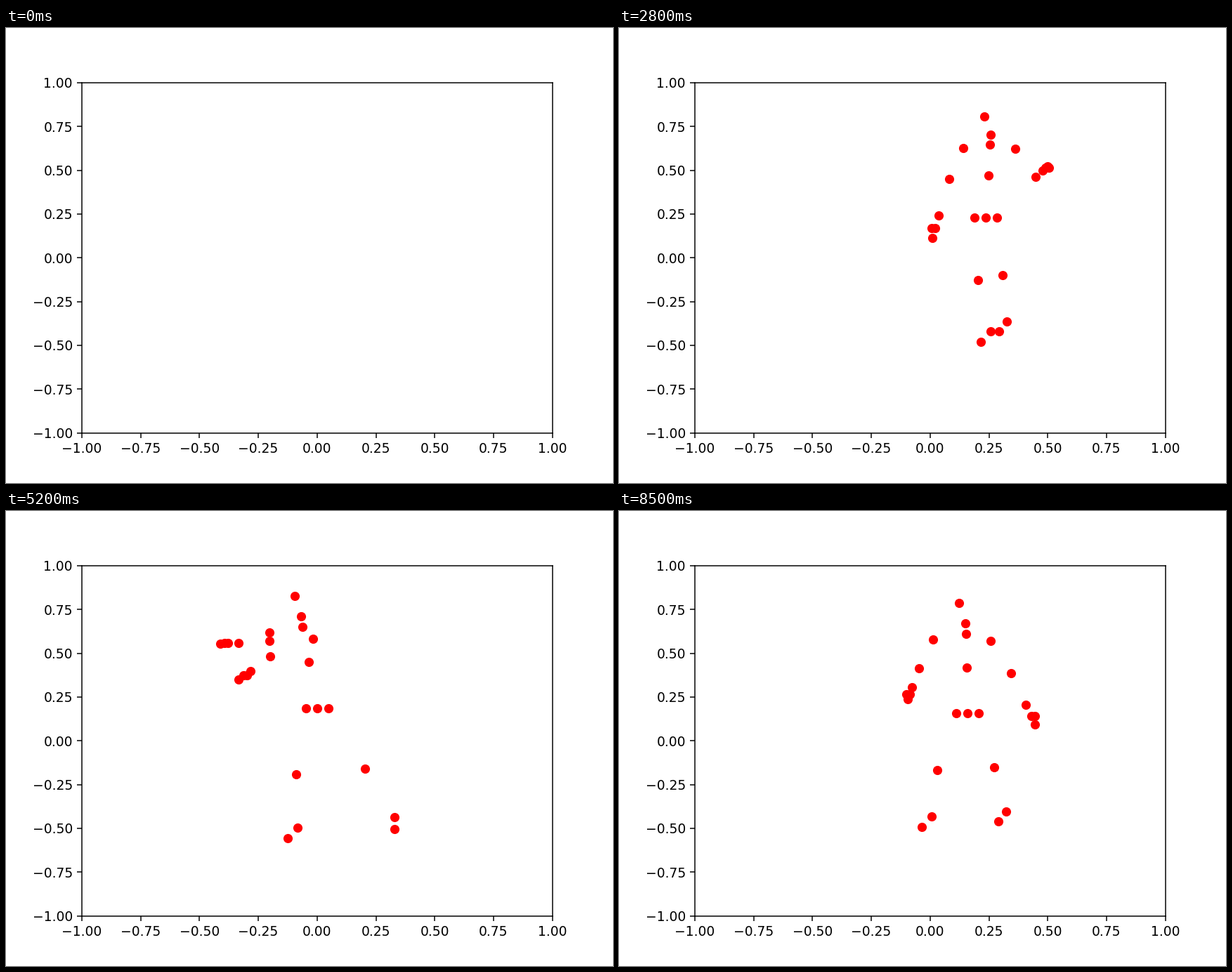
Recreate the animation shown at these times as a matplotlib script. Size 864x648 px, loop 8.6 s.

```python
import numpy as np
import matplotlib.pyplot as plt
from matplotlib.animation import FuncAnimation

FRAMES, STEP = 86, 100
# Stage pixels as complex numbers (y down): axes centre and half size
CENTRE, HALF_W, HALF_H = 443.4 + 327.8j, 334.8, 249.48


def ramp(i, start, end):
    return min(max((i - start) / (end - start), 0), 1)


def ease(i, start, end):
    u = ramp(i, start, end)
    return u * u * (3 - 2 * u)


def pulse(i, start, end):
    return np.sin(np.pi * ramp(i, start, end))


def follow(weights, first, *stops):
    """Move through the stops one after another."""
    p = first
    for w, stop in zip(weights, stops):
        p += w * (stop - p)
    return p


def arm(shoulder, elbow, hand, side):
    """Elbow and hand are relative to the shoulder; the rest follows."""
    forearm = hand - elbow
    offsets = [0, elbow, hand - forearm / 4, hand, hand + forearm / 5,
               hand + 5 * side]
    return [shoulder + d for d in offsets]


def leg(hip, ankle, foot, bow):
    knee = hip + 0.55 * (ankle - hip) + bow
    return [hip, knee, ankle, ankle + foot]


def figure_at(i):
    """All joints of the body at step i."""
    wave = ramp(i, 18, 38) ** 2
    lift = 1 - (1 - ramp(i, 21, 38)) ** 2
    turn = ease(i, 39, 50)
    sink = ease(i, 52, 73)
    back = ease(i, 77, 85)

    # Spine: a slightly bowed line from head to base
    base = (523 + 270j + 2j * wave + (-79 + 10j) * turn
            + (-7 + 17j) * sink + (60 - 10j) * back)
    head = (base - 4 - 144j + 5 * wave - (33 + 16j) * turn
            - (1 + 3j) * sink + (21 + 6j) * back)
    bow = 11 - 8 * turn + 3 * sink + 2 * back
    neck, chest, waist = [head + f * (base - head) + bow * (1 - f)
                          for f in (0.18, 0.275, 0.585)]

    shoulder_a = (chest - 36 + 4j + (-11 + 4j) * wave
                  + (7 - 7j) * (sink - back))
    shoulder_b = (chest + 32 + 10j + (5 - 5j) * lift + (-22 + 12j) * turn
                  + (8 - 9j) * sink + (12 + 2j) * back)

    moves = wave, turn, sink, back
    elbow_a = follow(moves, -11 + 47j, -44 + 35j, 12j, -12 + 34j, -20 + 41j)
    hand_a = follow(moves, -19 + 118j, -100 + 104j, -59 + 15j, -60 + 85j,
                    -33 + 78j) - 35 * pulse(i, 75, 85)
    moves = lift, turn, sink, back
    elbow_b = follow(moves, 5 + 51j, 42 + 34j, -61 + 25j, 2 + 44j, 29 + 46j)
    hand_b = follow(moves, 116j, 46 - 20j, -99 + 52j, -17 + 101j,
                    58 + 107j) + 15 * np.sin(np.pi * lift)

    ankle_a = (538 + 434j - (33 + 6j) * wave + (-89 + 24j) * turn
               - (5 + 7j) * sink + (35 - 9j) * back)
    ankle_b = (566 + 437j - 12 * turn - (10 + 5j) * sink
               + (8 - 3j) * back - (13 + 18j) * pulse(i, 23, 33))
    foot_b = -11 + 14j + (11 + 3j) * (turn - back)

    return np.array([head, neck, chest, waist, base]
                    + arm(shoulder_a, elbow_a, hand_a, -1)
                    + arm(shoulder_b, elbow_b, hand_b, 1)
                    + leg(base - 16.5, ankle_a, -14 + 15j, -8)
                    + leg(base + 16, ankle_b, foot_b, 0))


fig, ax = plt.subplots(figsize=(6.4, 4.8), dpi=135)
ax.set_xlim(-1, 1)
ax.set_ylim(-1, 1)
dots, = ax.plot([], [], "ro")


def draw(i):
    joints = figure_at(i) - CENTRE if i else np.array([])
    dots.set_data(joints.real / HALF_W, -joints.imag / HALF_H)
    return dots,


def reset():
    return draw(0)


anim = FuncAnimation(fig, draw, frames=FRAMES, init_func=reset,
                     interval=STEP, repeat=True)
plt.show()
```
